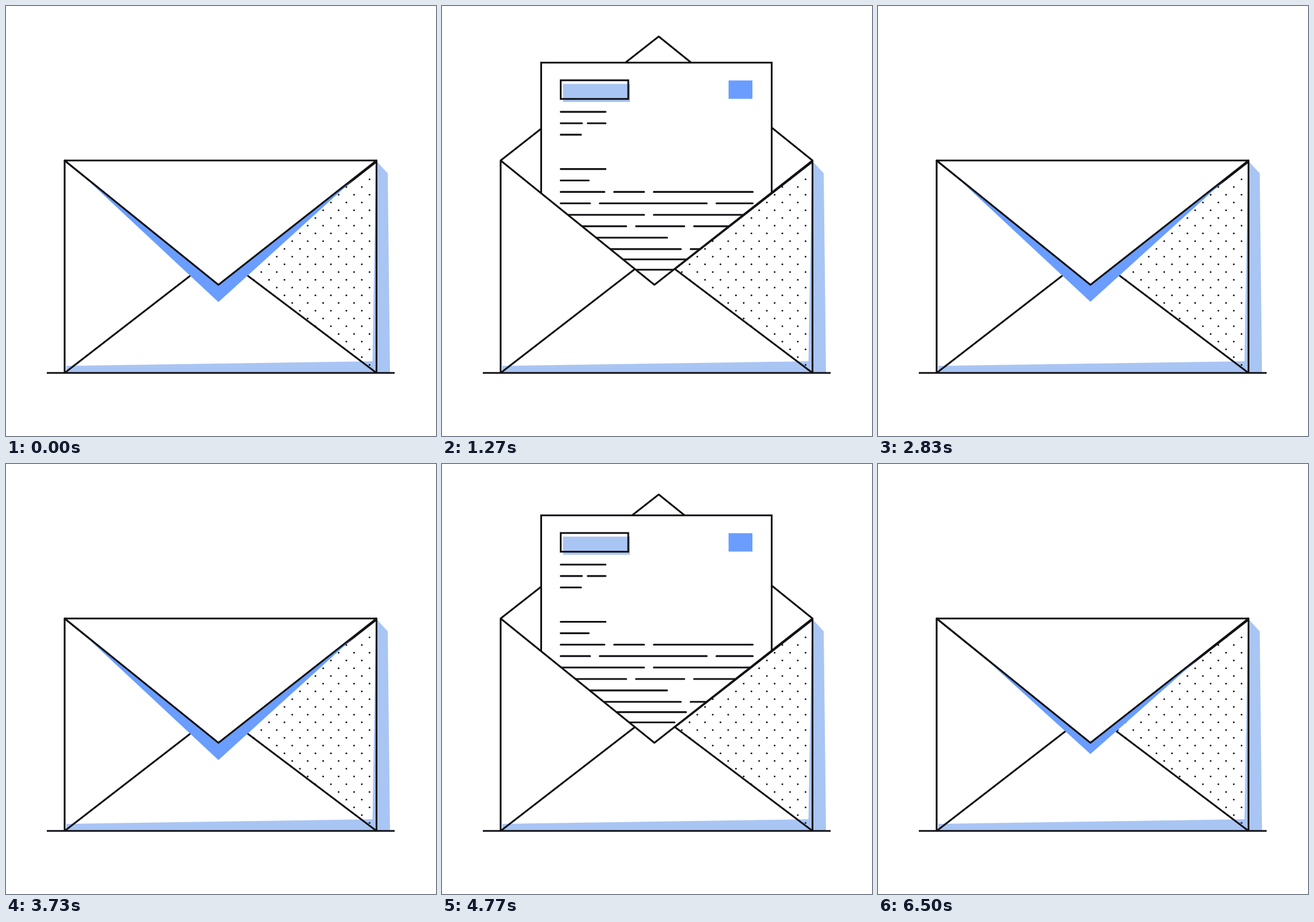
Animation, 748 px wide and 748 px high, one loop 6530 ms. Source, as an HTML page with a canvas:

```html
<!DOCTYPE html>
<html>
<head>
<meta charset="utf-8">
<title>Envelope</title>
<style>
html, body { margin: 0; width: 100%; height: 100%; overflow: hidden; background: #fff; }
canvas { display: block; width: 748px; height: 748px; }
</style>
</head>
<body>
<canvas id="stage" width="748" height="748"></canvas>
<script>
const ctx = document.getElementById('stage').getContext('2d');
const LOOP = 6530, CYCLE = 3750;
const INK = '#121216', PALE = '#a9c5f3', BLUE = '#6a9dff', WHITE = '#fff';
const L = 102, R = 644.5, TOP = 268.8, BASE = 638.3;
const TIP = [369.5, 485];
const REST_Y = 98.5, PEAK_Y = 80, HIDDEN_Y = 300;

const clamp = u => Math.min(1, Math.max(0, u));
const span = (t, a, b) => clamp((t - a) / (b - a));
const mix = (a, b, u) => a + (b - a) * u;
const cubic = u => u < 0.5 ? 4 * u ** 3 : 1 - 4 * (1 - u) ** 3;
const smooth = u => u * u * (3 - 2 * u);

function trace(pts, close) {
  ctx.beginPath();
  pts.forEach(([x, y], i) => i ? ctx.lineTo(x, y) : ctx.moveTo(x, y));
  if (close) ctx.closePath();
}
function fill(pts, color) {
  trace(pts, true);
  ctx.fillStyle = color;
  ctx.fill();
}
function stroke(pts, close) {
  trace(pts, close);
  ctx.stroke();
}

// One ruled line of writing, broken by gaps at the given centres
function writeRow(row, width, gaps = [], gap = 16) {
  const y = 85.6 + row * 19.9;
  let x = 206.5;
  for (const g of [...gaps, 206 + width + gap / 2]) {
    stroke([[x, y], [g - gap / 2 - 0.5, y]]);
    x = g + gap / 2 + 0.5;
  }
}

function drawWriting() {
  const name = 79, full = 335;
  writeRow(0, name);
  writeRow(1, name, [248.5], 9);
  writeRow(2, name * 0.46);
  writeRow(5, name);
  writeRow(6, name * 0.63);
  const body = [[291, 360], [266, 469], [360], [329, 430], [], [424]];
  body.forEach((gaps, i) => writeRow(7 + i, gaps.length ? full : 186, gaps));
  for (let i = 0; i < 2; i++) writeRow(12.9 + i * 0.9, 219 - i * 20);
}

function drawLetter(y) {
  ctx.save();
  trace([[0, 0], [748, 0], [748, TOP], [R, TOP], TIP, [L, TOP], [0, TOP]], true);
  ctx.clip();
  ctx.translate(0, y);
  ctx.lineJoin = 'miter';
  ctx.fillStyle = WHITE;
  ctx.fillRect(172.5, 0, 401, 520);
  ctx.strokeRect(172.5, 0, 401, 520);
  ctx.fillStyle = PALE;
  ctx.fillRect(210.5, 37, 116.5, 31.5);
  ctx.strokeRect(206.5, 30.7, 117.5, 32.5);
  ctx.fillStyle = BLUE;
  ctx.fillRect(498.5, 31, 41.5, 32);
  ctx.lineCap = 'round';
  drawWriting();
  ctx.restore();
}

function drawDots() {
  const step = 13.45;
  ctx.fillStyle = INK;
  for (let i = 0; i < 17; i++) {
    const x = 632.4 - i * step;
    const low = 458 + (x - 405) * 0.7516;
    const high = TIP[1] - (x - TIP[0]) * 0.7855;
    for (let y = 301.4 + (i % 2) * step; y < low; y += 2 * step) {
      if (y < high) continue;
      ctx.beginPath();
      ctx.arc(x, y, 1.5, 0, 7);
      ctx.fill();
    }
  }
}

function drawPocket() {
  fill([[L, TOP], TIP, [R, TOP], [R, BASE], [L, BASE]], WHITE);
  fill([[105, 626], [637.5, 618], [643, 300], [R, 300], [R, BASE], [105, BASE]], PALE);
  drawDots();
  stroke([[L, BASE], [335, 458]]);
  stroke([[R, BASE], [405, 457.5], [R, TOP + 2]]);
  stroke([[L, BASE], [L, TOP], TIP, [R, TOP], [R, BASE]]);
  stroke([[71, BASE], [676, BASE]]);
}

function drawFlap(open, depth) {
  const tip = [mix(TIP[0], 377, open), mix(TIP[1], 53, open)];
  const corners = [[L, TOP], tip, [R, TOP]];
  const shut = tip[1] > TOP;
  if (shut && depth > 0) {
    const inset = 3.5 + (30 - depth) * 0.41;
    fill([[L + inset, TOP], [tip[0], tip[1] + depth], [R - inset, TOP]], BLUE);
  }
  fill(corners, WHITE);
  stroke(corners, shut);
}

function letterTop(p) {
  return mix(HIDDEN_Y, PEAK_Y, smooth(span(p, 350, 840)))
    + (REST_Y - PEAK_Y) * smooth(span(p, 840, 1200))
    - 23.5 * smooth(span(p, 1840, 2050))
    + (HIDDEN_Y - 75) * cubic(span(p, 2050, 2420));
}

function render(time) {
  const p = time % LOOP % CYCLE;
  const open = cubic(span(p, 0, 390)) - cubic(span(p, 2330, 2660));
  const depth = 30 * (p < 1500 ? clamp(1 - 2 * open) : smooth(span(p, 2600, 2850)));

  ctx.fillStyle = WHITE;
  ctx.fillRect(0, 0, 748, 748);
  ctx.strokeStyle = INK;
  ctx.lineWidth = 3.1;
  ctx.lineJoin = 'round';
  ctx.lineCap = 'butt';

  fill([[R, 270], [664, 291], [668, BASE], [R, BASE]], PALE);
  const raised = open > 0.5;
  if (raised) drawFlap(open, 0);
  drawLetter(letterTop(p));
  drawPocket();
  if (!raised) drawFlap(open, depth);
}

const start = performance.now();
function tick() {
  render(performance.now() - start);
  requestAnimationFrame(tick);
}
tick();
</script>
</body>
</html>
```
